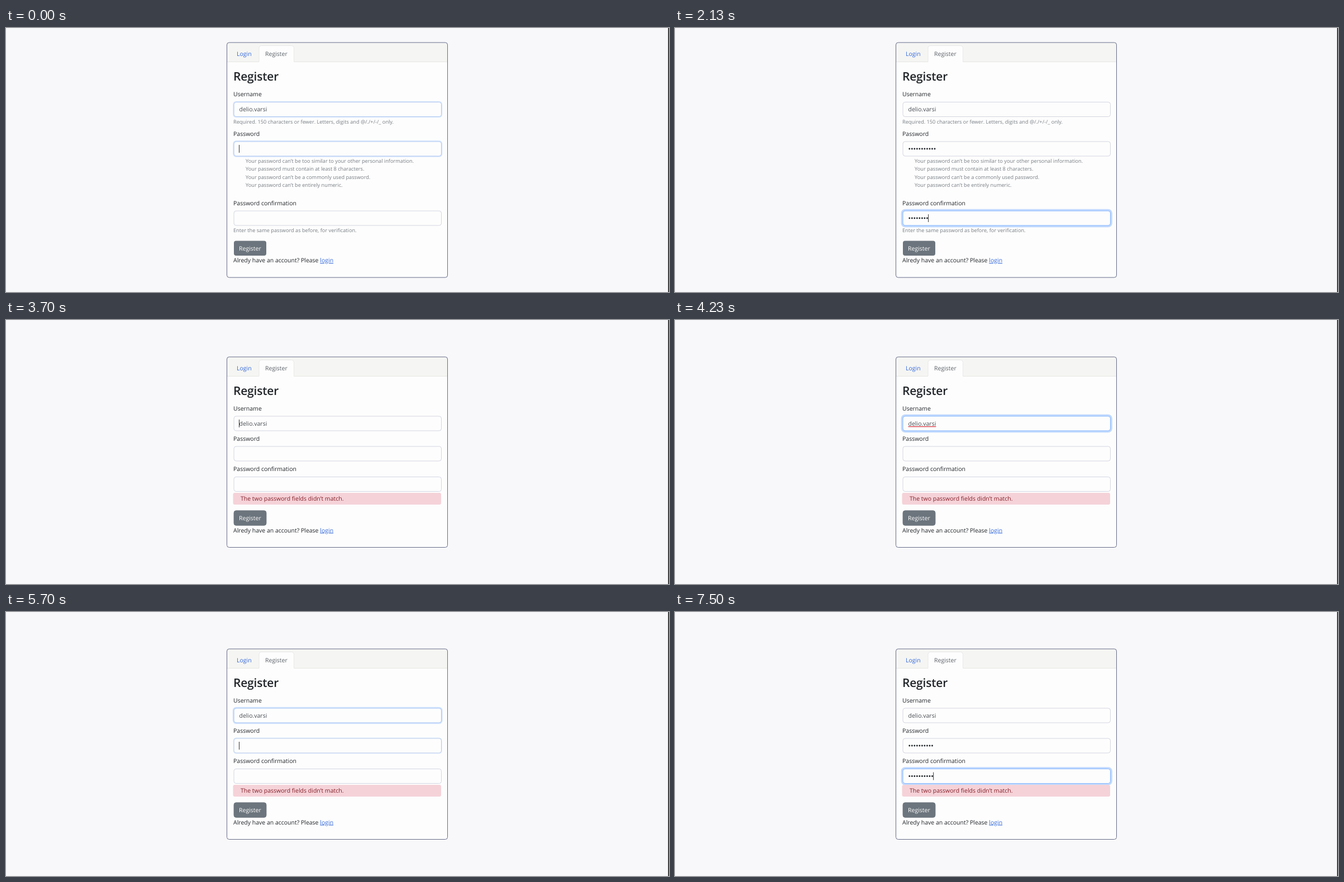
Write an HTML page that moves like this. It is 1187 px wide and 472 px high and loops after 8000 ms.

```html
<!DOCTYPE html>
<html lang="en">
<head>
<meta charset="utf-8">
<title>Register form</title>
<style>
  html, body { margin: 0; width: 100%; height: 100%; overflow: hidden; background: #f8f8fa; }
  svg { display: block; width: 1187px; height: 472px; }
  text {
    font: 10.5px "Open Sans", "Noto Sans", sans-serif;
    fill: #212529;
    text-rendering: geometricPrecision;
    white-space: pre;
  }
  .title { font-size: 21px; font-weight: 600; letter-spacing: -.01em; }
  .help { font-size: 9.2px; fill: #777d83; }
  .value { fill: #454a50; }
  .tab { fill: #5a6067; }
  .link { fill: #3469dc; }
  .under { text-decoration: underline; }
  .light { fill: #fff; }
  .error { fill: #842029; }
</style>
</head>
<body>
<svg id="stage" viewBox="0 0 1187 472"></svg>
<script>
const LOOP = 8000, FADE = 150, BLINK = 530;
const USER = "delio.varsi";
const LEFT = 417.5, DOT_STEP = 4.52;
const stage = document.getElementById("stage");

function add(parent, tag, attrs = {}, content = "") {
  const el = document.createElementNS("http://www.w3.org/2000/svg", tag);
  set(el, attrs);
  el.textContent = content;
  return parent.appendChild(el);
}
function set(el, attrs) {
  for (const key in attrs) el.setAttribute(key, attrs[key]);
}
function show(el, on) {
  el.setAttribute("visibility", on ? "inherit" : "hidden");
}
const label = (parent, x, y, content, cls = "") =>
  add(parent, "text", { x, y, class: cls }, content);

function addCard(top, height) {
  const g = add(stage, "g"), y = top + .5;
  add(g, "rect", { x: 395.5, y, width: 395, height, rx: 4, fill: "#fdfdfd" });
  add(g, "path", { d: `M395.5 ${y + 34.5}v-30.5q0-4 4-4h387q4 0 4 4v30.5z`, fill: "#f5f5f3" });
  add(g, "path", { d: `M396 ${y + 34.5}h394`, stroke: "#e6e6e4" });
  add(g, "path", {
    d: `M453 ${y + 35.5}v-26q0-4 4-4h54.5q4 0 4 4v26z`, fill: "#fdfdfd"
  });
  add(g, "path", {
    d: `M453 ${y + 34.5}v-25q0-4 4-4h54.5q4 0 4 4v25`, fill: "none", stroke: "#e9e9ea"
  });
  add(g, "rect", { x: 395.5, y, width: 395, height, rx: 4, fill: "none", stroke: "#666c88" });
  label(g, 413, top + 24.3, "Login", "link");
  label(g, 464, top + 24.3, "Register", "tab");
  label(g, 407, top + 68, "Register", "title");
  return g;
}

function addField(parent, y) {
  const frame = { x: 408, y, width: 371.5, height: 26, rx: 4 };
  const ring = add(parent, "rect", { ...frame, fill: "none", stroke: "#0d6efd" });
  const box = add(parent, "rect", { ...frame, fill: "#fdfdfd" });
  const dots = Array.from({ length: 11 }, (_, i) =>
    add(parent, "circle", { cx: LEFT + 2.3 + i * DOT_STEP, cy: y + 13, r: 1.45, fill: "#212529" }));
  const caret = add(parent, "rect", { y: y + 6, width: 1, height: 14, fill: "#333" });
  return { ring, box, dots, caret };
}

function addFooter(parent, y) {
  const frame = { x: 408, y, width: 58, height: 26.5, rx: 4 };
  const ring = add(parent, "rect", { ...frame, fill: "none", stroke: "#828a91" });
  const box = add(parent, "rect", { ...frame, fill: "#6c757d" });
  label(parent, 417, y + 17.3, "Register", "light");
  const note = label(parent, 407, y + 38.7, "Alredy have an account? Please ");
  add(note, "tspan", { class: "link under" }, "login");
  return { ring, box };
}

function mix(from, to, p) {
  return `rgb(${from.map((c, i) => Math.round(c + (to[i] - c) * p))})`;
}
function ease(p) {
  p = Math.min(1, Math.max(0, p));
  return p * p * (3 - 2 * p);
}
// Focus strength for a control focused from one time to another
function focusAt(t, from, to) {
  return ease((t - from) / FADE) * (1 - ease((t - to) / FADE));
}
function drawRing(ring, p) {
  set(ring, { "stroke-width": 1 + 5.6 * p, "stroke-opacity": .25 * p });
}

// Text changes are [time, dot count]; each one restarts the caret blink
function drawField(field, t, [from, to], edits = []) {
  const p = focusAt(t, from, to);
  drawRing(field.ring, p);
  set(field.box, { stroke: mix([212, 214, 226], [134, 183, 254], p) });
  let count = 0, last = from;
  for (const [time, n] of edits) if (t >= time) { count = n; last = time; }
  field.dots.forEach((dot, i) => show(dot, i < count));
  set(field.caret, { x: LEFT - .5 + count * DOT_STEP });
  show(field.caret, t >= from && t < to && Math.floor((t - last) / BLINK) % 2 === 0);
}
function typing(start, end, count) {
  return Array.from({ length: count }, (_, i) =>
    [start + (end - start) * i / (count - 1), i + 1]);
}

add(stage, "rect", { width: 1187, height: 472, fill: "#f8f8fa" });
add(stage, "rect", { x: 1185.5, width: 1.5, height: 472, fill: "#111" });

// First form, with hints
const first = addCard(25.5, 420);
label(first, 407, 122, "Username");
const user1 = addField(first, 132.5);
label(first, LEFT, 149, USER, "value");
label(first, 407, 170.5, "Required. 150 characters or fewer. Letters, digits and @/./+/-/_ only.", "help");
label(first, 407, 192.5, "Password");
const pass1 = addField(first, 203);
[
  "Your password can’t be too similar to your other personal information.",
  "Your password must contain at least 8 characters.",
  "Your password can’t be a commonly used password.",
  "Your password can’t be entirely numeric."
].forEach((hint, i) => label(first, 429, 240.5 + i * 14.6, hint, "help"));
label(first, 407, 317, "Password confirmation");
const again1 = addField(first, 327);
label(first, 407, 365, "Enter the same password as before, for verification.", "help");
const button1 = addFooter(first, 380.5);

// Second form, with the error
const second = addCard(65.5, 340.5);
label(second, 407, 162, "Username");
const user2 = addField(second, 172);
const name2 = label(second, LEFT, 188.5, USER, "value");
const spelling = add(second, "path", { stroke: "#d8343f", "stroke-width": 1.2 });
label(second, 407, 215.5, "Password");
const pass2 = addField(second, 226);
label(second, 407, 270, "Password confirmation");
const again2 = addField(second, 280.5);
add(second, "rect", { x: 406.5, y: 309, width: 372.5, height: 21, rx: 3, fill: "#f5d2d8" });
label(second, 420, 323.3, "The two password fields didn’t match.", "error");
addFooter(second, 340.8);
set(spelling, { d: `M${LEFT} 190.6h${name2.getComputedTextLength()}` });

const pass1Keys = [[-130, 0], ...typing(570, 1170, 11)];
const again1Keys = typing(1670, 2130, 8);

function draw(t) {
  const isFirst = t < 3700;
  show(first, isFirst);
  show(second, !isFirst);
  if (isFirst) {
    drawField(user1, t, [-2000, -75]);
    drawField(pass1, t, [-75, 1370], pass1Keys);
    drawField(again1, t, [1370, 2870], again1Keys);
    const p = focusAt(t, 2870, LOOP);
    drawRing(button1.ring, p);
    set(button1.ring, { "stroke-opacity": .5 * p });
    set(button1.box, { fill: mix([108, 117, 125], [88, 95, 102], p) });
  } else {
    drawField(user2, t, [3700, 5640]);
    show(spelling, t >= 3930 && t < 5640);
    drawField(pass2, t, [5640, 6770], [[6270, 10]]);
    drawField(again2, t, [6770, LOOP + FADE], [[7500, 10]]);
  }
}

const start = performance.now();
function tick() {
  draw((performance.now() - start) % LOOP);
  requestAnimationFrame(tick);
}
tick();
</script>
</body>
</html>
```
